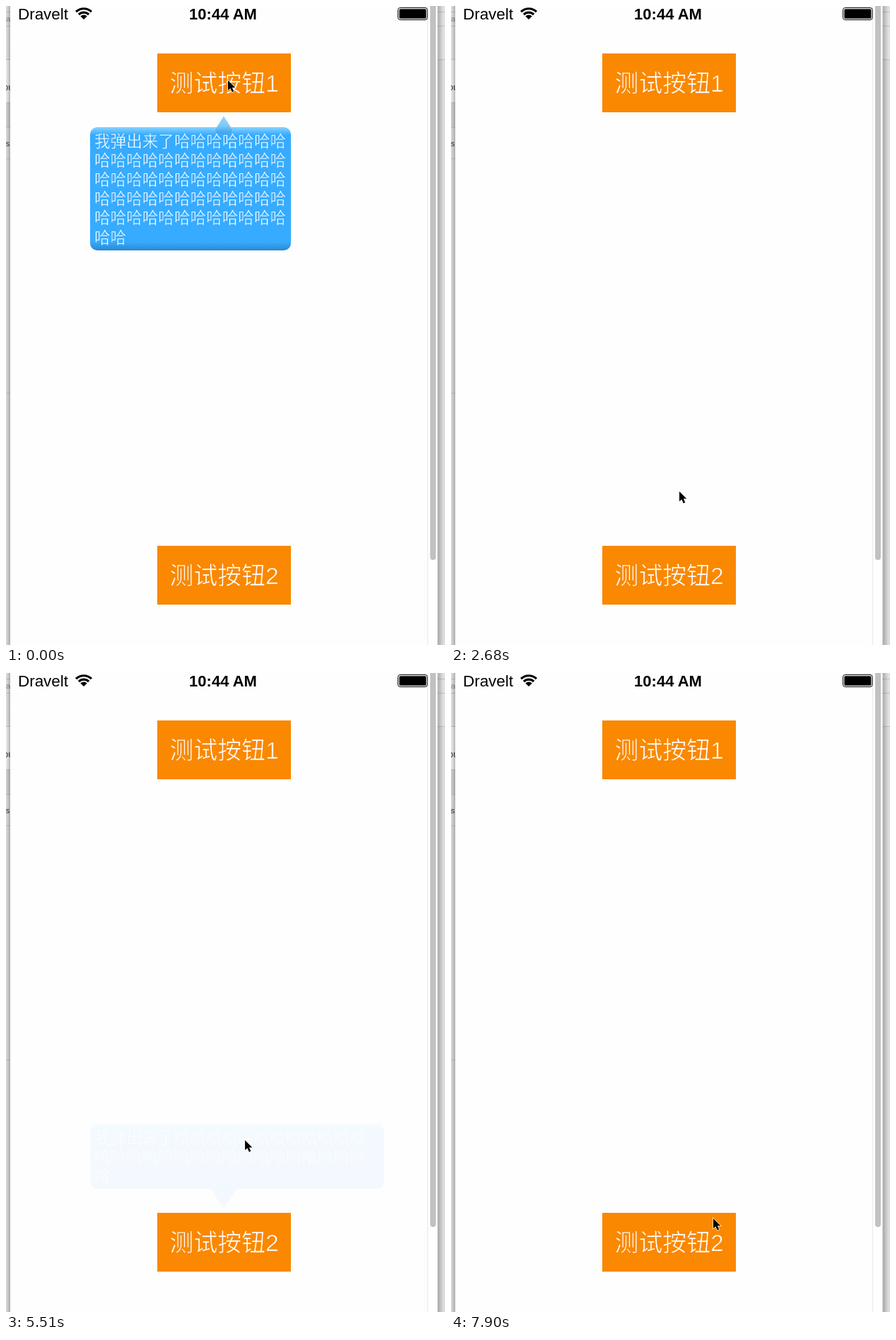
An HTML page that plays this animation: 621 by 902 pixels, repeating every 8000 ms.

```html
<!DOCTYPE html>
<html lang="zh-CN">
<head>
<meta charset="utf-8">
<title>Popover</title>
<style>
  html, body { margin: 0; width: 100%; height: 100%; overflow: hidden; background: #fefefe; }
  svg { display: block; width: 621px; height: 902px; }
  text { font-family: "Liberation Sans", "Noto Sans CJK SC", "Noto Sans CJK", sans-serif; white-space: pre; }
</style>
</head>
<body>
<svg viewBox="0 0 621 902">
  <defs>
    <linearGradient id="shadeL"><stop offset="0" stop-opacity="0"/><stop offset="1" stop-opacity=".22"/></linearGradient>
    <linearGradient id="shadeR"><stop offset="0" stop-opacity=".26"/><stop offset=".8" stop-opacity="0"/></linearGradient>
    <linearGradient id="upArrow" x2="0" y2="1">
      <stop offset="0" stop-color="#92d6ff"/><stop offset=".5" stop-color="#7cc9fa"/>
      <stop offset=".8" stop-color="#48a9ec"/><stop offset="1" stop-color="#36abff"/>
    </linearGradient>
  </defs>

  <!-- window behind -->
  <rect width="621" height="902" fill="#dcdcdc"/>
  <rect width="621" height="76" fill="#e2e2e2"/>
  <rect y="76" width="6" height="60" fill="#ececec"/>
  <rect y="136" width="6" height="35" fill="#d2d2d2"/>
  <path d="M0 8.5H621M0 28.5H621M0 75.5H621M0 136.5H6M0 171.5H6M0 215.5H6M0 546.5H6" stroke="#c2c2c2"/>
  <g font-size="11" fill="#333">
    <text x="-6" y="22" fill="#888">aa</text>
    <text x="-4" y="119" font-size="13">ou</text>
    <text x="-4" y="198">rs</text>
  </g>
  <rect width="6" height="902" fill="url(#shadeL)"/>
  <rect x="610" width="11" height="902" fill="url(#shadeR)"/>

  <!-- phone screen -->
  <rect x="6" width="604.5" height="902" fill="#fefefe"/>
  <rect x="596" width="1" height="902" fill="#e9e9e9"/>
  <rect x="600" y="-10" width="8" height="792" rx="4" fill="#c1c1c1"/>
  <text x="17" y="19" font-size="22.4">Dravelt</text>
  <text x="307" y="19" font-size="22" font-weight="700" text-anchor="middle">10:44 AM</text>
  <g fill="none" stroke="#000" stroke-width="3.2">
    <path d="M99.1 8.2A15.6 15.6 0 0 1 120.9 8.2"/>
    <path d="M102.9 12A10.1 10.1 0 0 1 117.1 12"/>
  </g>
  <path d="M110 19L105.3 14.4A6.6 6.6 0 0 1 114.7 14.4Z"/>
  <rect x="554.5" y="2.5" width="41.5" height="17" rx="3" fill="none" stroke="#000"/>
  <rect x="556.3" y="4.2" width="38" height="13.6" rx="1.5"/>

  <g id="buttons"></g>
  <g id="tip1"></g>
  <g id="tip2"></g>
  <path id="cursor" d="M0 0V14L3.3 11.2L5.8 16.6L8.3 15.5L5.9 10.3H10.3Z" stroke="#fff" stroke-width="1.4" paint-order="stroke"/>
</svg>
<script>
const $ = id => document.getElementById(id);
const ORANGE = "#fa8800", BLUE = "#36abff";
const rect = (x, y, w, h, fill, rx = 0) =>
  `<rect x="${x}" y="${y}" width="${w}" height="${h}" rx="${rx}" fill="${fill}"/>`;
// white text, thinned by an outline in the colour behind it
const label = (x, y, size, s, back) =>
  `<text x="${x}" y="${y}" font-size="${size}" fill="#fff" stroke="${back}" stroke-width="${size * .022}">${s}</text>`;

$("buttons").innerHTML = [67, 762].map((y, i) =>
  rect(214, y, 189, 83, ORANGE) + label(231.5, y + 54, 33.9, "测试按钮" + (i + 1), ORANGE)).join("");

// balloon body with a pale top edge and a dark bottom edge
function balloon(id, y, w, h, dark, perLine, laughs, arrow) {
  const stop = (px, c) => `<stop offset="${px / h}" stop-color="${c}"/>`;
  const words = "我弹出来了" + "哈".repeat(laughs);
  let lines = "";
  for (let i = 0; i * perLine < words.length; i++)
    lines += label(125, y + 28 + i * 27.1, 22.6, words.substr(i * perLine, perLine), BLUE);
  $(id).innerHTML = `<linearGradient id="${id}Fill" x2="0" y2="1">` +
    stop(0, "#8ad3ff") + stop(11, BLUE) + stop(h - dark, BLUE) + stop(h, "#2a88cf") +
    "</linearGradient>" + rect(119, y, w, h, `url(#${id}Fill)`, 10) + arrow + lines;
}
balloon("tip1", 171, 284, 174, 12, 12, 57,
  '<path d="M308 155.5L318.5 172L320 177L314 183H302L296 177L297.5 172Z" fill="url(#upArrow)"/>');
balloon("tip2", 636, 416, 92, 6, 17, 30,
  `<path d="M289 727.5H327L308 756Z" fill="${BLUE}"/>`);

// the screen refreshes only in bursts: start, number of steps
const STEP = 150;
const bursts = [[450, 7], [2090, 5], [2980, 2], [3870, 2], [4620, 3], [5510, 4], [6260, 3], [7150, 6]];
function refreshTime(t) {
  const burst = bursts.findLast(b => t >= b[0]);
  return burst ? burst[0] + STEP * Math.min(burst[1] - 1, Math.floor((t - burst[0]) / STEP)) : 0;
}

const clamp = v => Math.max(0, Math.min(1, v));
const smooth = u => u * u * (3 - 2 * u);

// cursor glides: start, end, x, y, sideways bow
const glides = [[600, 900, 323, 102, 0], [2090, 2680, 323, 782, 0],
  [5340, 5960, 343, 117, 15], [7150, 7900, 371, 770, 45]];
function cursorAt(t) {
  let x = 314, y = 105;
  for (const [a, b, tx, ty, bow] of glides) {
    const u = clamp((t - a) / (b - a)), e = smooth(u);
    x += (tx - x) * e + bow * Math.sin(Math.PI * u);
    y += (ty - y) * e;
  }
  return `${x} ${y}`;
}

// each balloon pops up at the first time of a pair and starts to fade at the second
const shown1 = [[-500, 400], [967, 2000], [6210, 7140]];
const shown2 = [[2807, 3720], [4506, 5320]];
function pose(id, shown, t, tipY) {
  const [show, hide] = shown.findLast(s => t >= s[0]) || [0, -500];
  const u = t - show;
  const alpha = clamp(u / 200) * clamp(1 - (t - hide) / 200);
  const scale = u < 200 ? .75 + .35 * u / 200 : 1.1 - .1 * clamp((u - 200) / 100);
  $(id).setAttribute("opacity", alpha);
  $(id).setAttribute("transform", `translate(308 ${tipY}) scale(${scale}) translate(-308 ${-tipY})`);
}

const start = performance.now();
function draw() {
  const t = refreshTime((performance.now() - start) % 8000);
  pose("tip1", shown1, t, 156);
  pose("tip2", shown2, t, 756);
  $("cursor").setAttribute("transform", `translate(${cursorAt(t)})`);
  requestAnimationFrame(draw);
}
draw();
</script>
</body>
</html>
```
